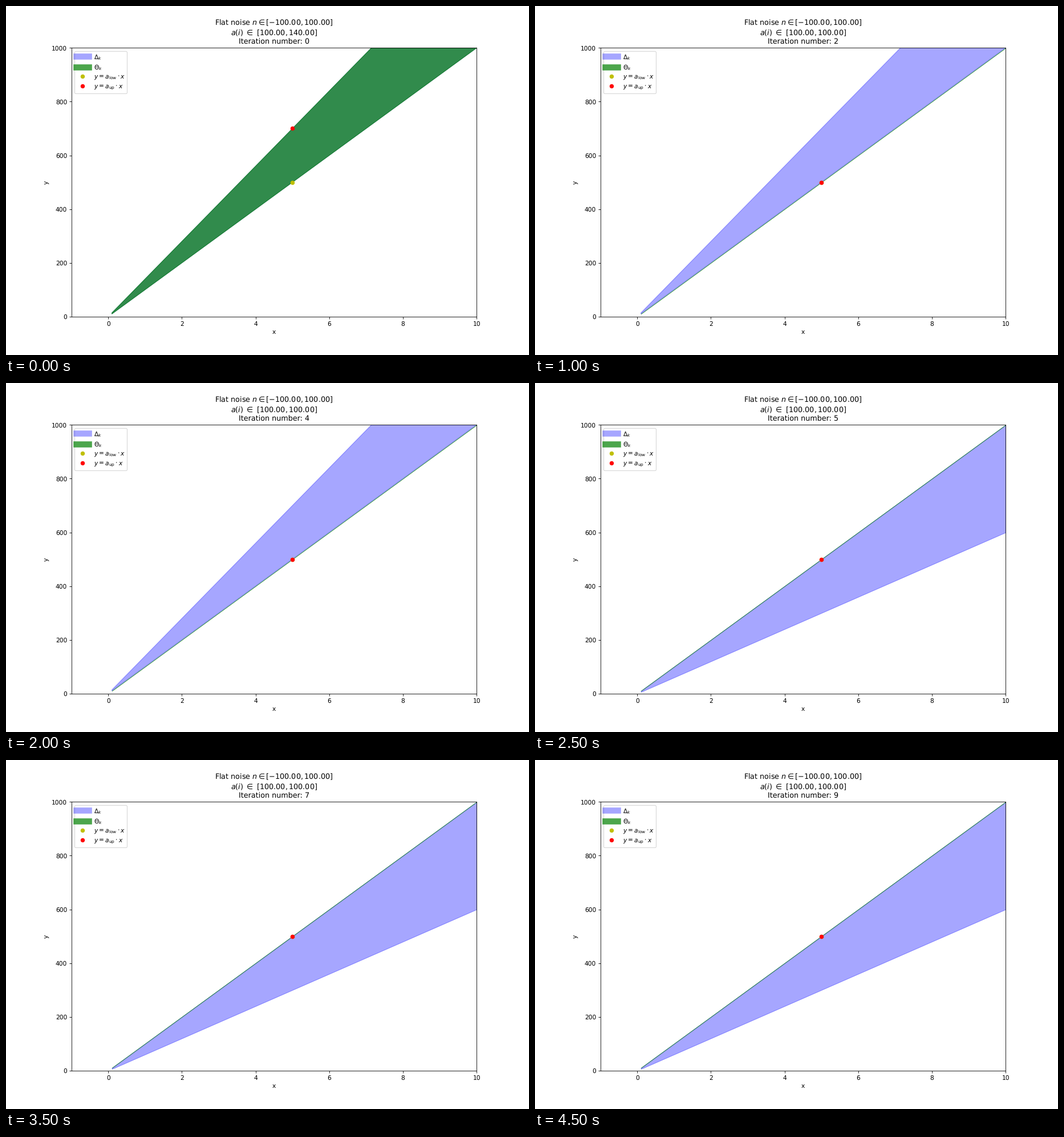
A matplotlib script that plays this animation: 917 by 611 pixels, repeating every 5 s.

```python
import matplotlib.pyplot as plt
from matplotlib.animation import FuncAnimation
from matplotlib.collections import PolyCollection

W, H = 917, 611
DPI = W / 12
STEPS, INTERVAL = 10, 500
X0, X1 = 0.1, 10
MARK_X = 5
NOISE = 100

plt.rcParams["text.hinting"] = "none"

fig, ax = plt.subplots(figsize=(W / DPI, H / DPI), dpi=DPI)
ax.set(xlim=(-1, 10), ylim=(0, 1000), xlabel="x", ylabel="y")


def wedge(low, up):
    """Area between the lines y = low * x and y = up * x."""
    return [(X0, low * X0), (X1, low * X1), (X1, up * X1), (X0, up * X0)]


def band(color, alpha, label):
    area = PolyCollection([wedge(100, 140)], facecolor=color, edgecolor=color,
                          alpha=alpha, linewidth=1)
    ax.add_collection(area, autolim=False)
    key, = ax.plot([], [], color=color, alpha=alpha, lw=10, label=label)
    return area, key


def dot(color, name):
    label = rf"$y = a_{{\mathrm{{{name}}}}} \cdot x$"
    return ax.plot([MARK_X], [0], color + "o", label=label)[0]


delta, delta_key = band("blue", 0.35, r"$\Delta_k$")
theta, theta_key = band("green", 0.7, r"$\Theta_k$")
low_dot = dot("y", "low")
up_dot = dot("r", "up")
ax.legend(handles=[delta_key, theta_key, low_dot, up_dot], loc="upper left",
          borderpad=0.32, labelspacing=0.42, handlelength=2.08)
title = ax.set_title("")


def bounds(k):
    """Measured interval and the estimate left after iteration k."""
    if k == 0:
        return (100, 140), (100, 140)
    return ((60, 100) if k % 2 else (100, 140)), (100, 100)


def update(k):
    measured, (low, up) = bounds(k)
    delta.set_verts([wedge(*measured)])
    theta.set_verts([wedge(low, up)])
    low_dot.set_ydata([low * MARK_X])
    up_dot.set_ydata([up * MARK_X])
    title.set_text(
        rf"Flat noise $n \in [-{NOISE:.2f}, {NOISE:.2f}]$" "\n"
        rf"$a(i)$ $\in$ $[{low:.2f}, {up:.2f}]$" "\n"
        f"Iteration number: {k}"
    )
    return delta, theta, low_dot, up_dot, title


anim = FuncAnimation(fig, update, frames=STEPS, interval=INTERVAL,
                     init_func=lambda: update(0), repeat=True, repeat_delay=0)
plt.show()
```
